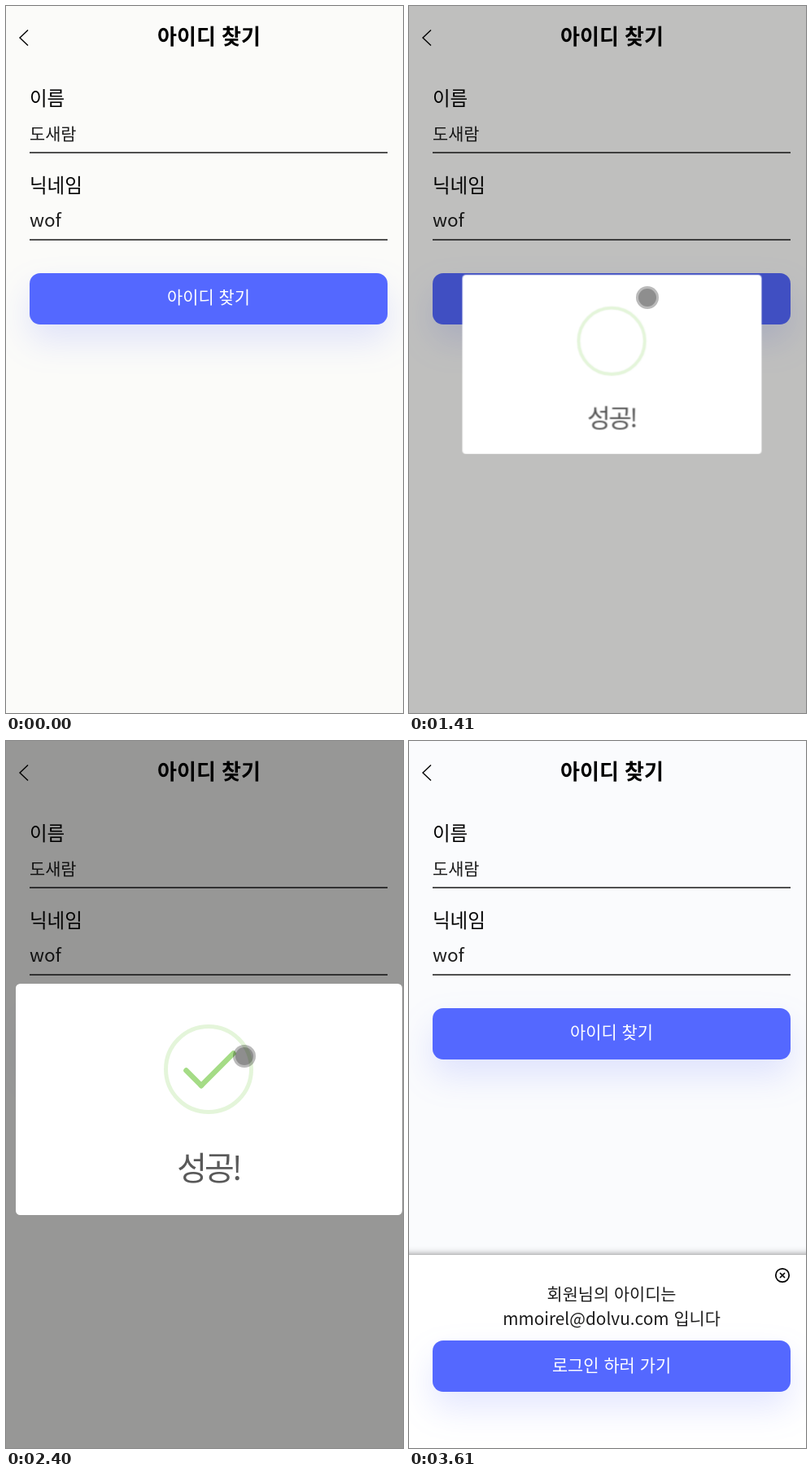
Animation, 488 px wide and 868 px high, one loop 4810 ms. Source, as an HTML page:

```html
<!DOCTYPE html>
<html lang="ko">
<head>
<meta charset="utf-8">
<title>아이디 찾기</title>
<style>
  html, body { margin: 0; width: 100%; height: 100%; overflow: hidden; background: #fbfbf9; }
  svg { display: block; width: 488px; height: 868px; font-family: "Noto Sans CJK KR", "Noto Sans CJK", "Noto Sans", sans-serif; }
  .mid { text-anchor: middle; }
  .title { font-size: 26px; font-weight: 700; }
  .label { font-size: 23.5px; font-weight: 500; }
  .thin { font-size: 20.8px; font-weight: 100; fill: #1c1c1c; }
  .latin { font-size: 22.5px; }
  .field { stroke: #505050; stroke-width: 2; }
  .btn rect { fill: #5468ff; filter: drop-shadow(0 20px 20px rgba(84, 104, 255, .16)); }
  .btn text { font-size: 20.9px; font-weight: 500; fill: #fff; text-anchor: middle; }
  .line { fill: none; stroke: #000; stroke-width: 1.4; }
  .close { stroke-width: 1.7; }
  #press { fill: #33b5e5; fill-opacity: .4; }
  #panel { fill: #fff; filter: drop-shadow(0 0 5px rgba(0, 0, 0, .5)); }
  #popup { transform-origin: 249.5px 440px; }
  #popup text { font-size: 40px; font-weight: 300; letter-spacing: -3px; fill: #595959; }
  .ring { fill: none; stroke: #a5dc86; stroke-opacity: .3; stroke-width: 5; }
  .tick { fill: none; stroke: #a5dc86; stroke-width: 6.6; stroke-linecap: round; }
</style>
</head>
<body>
<svg viewBox="0 0 488 868">
  <rect id="page" width="488" height="868" fill="#fbfbf9"/>
  <path class="line" d="M27 29.5L17 39L27 48.5"/>
  <text class="title mid" x="249.5" y="46.5">아이디 찾기</text>
  <text class="label" x="29" y="122">이름</text>
  <text class="thin" x="29" y="164.5">도새람</text>
  <path class="field" d="M29 180H469M29 287H469"/>
  <text class="label" x="29" y="229">닉네임</text>
  <text class="thin latin" x="29" y="271">wof</text>
  <g class="btn">
    <rect x="29" y="328" width="440" height="63" rx="13"/>
    <text x="249" y="364.5">아이디 찾기</text>
  </g>
  <rect id="press" x="29" y="328" width="440" height="63"/>

  <g id="sheet">
    <rect id="panel" x="-20" y="631" width="528" height="260"/>
    <circle class="line close" cx="459" cy="656" r="8.2"/>
    <path class="line close" d="M456 653l6 6m0-6l-6 6"/>
    <text class="thin mid" x="249" y="686.5">회원님의 아이디는</text>
    <text class="thin mid" x="249" y="716.5">mmoirel@dolvu.com 입니다</text>
    <g class="btn">
      <rect x="29" y="736" width="440" height="63" rx="13"/>
      <text x="249" y="773.5">로그인 하러 가기</text>
    </g>
  </g>

  <rect id="dim" width="488" height="868"/>
  <g id="popup">
    <rect x="12" y="298" width="475" height="284" rx="5.5" fill="#fff"/>
    <circle class="ring" cx="249" cy="403" r="52.5"/>
    <path id="tip" class="tick"/>
    <path id="stem" class="tick"/>
    <text class="mid" x="249" y="539">성공!</text>
  </g>

  <g id="cursor">
    <circle r="14" fill-opacity=".27"/>
    <circle r="11" fill-opacity=".24"/>
  </g>
</svg>
<script>
  const LOOP = 4810, STEP = 1000 / 15;
  const tracks = [];

  // stops: [ms, value, easing towards the next stop]
  function track(id, prop, stops) {
    const poses = stops.map(([ms, value, easing = 'linear']) => ({ offset: ms / LOOP, [prop]: value, easing }));
    if (poses[0].offset > 0) poses.unshift({ ...poses[0], offset: 0, easing: 'step-end' });
    poses.push({ ...poses[poses.length - 1], offset: 1 });
    const anim = document.getElementById(id).animate(poses, { duration: LOOP, iterations: Infinity });
    anim.pause();
    tracks.push(anim);
  }

  const move = (x, y) => `translate(${x}px, ${y}px)`;
  const seg = (x1, y1, x2, y2) => `path("M${x1} ${y1}L${x2} ${y2}")`;
  const hold = 'step-end';

  track('cursor', 'transform', [
    [0, move(436, 890), hold],
    [133, move(435, 864)], [333, move(422, 745)], [467, move(400, 665)],
    [533, move(376, 606)], [600, move(350, 553)], [666, move(328, 491)],
    [733, move(311, 425)], [800, move(298, 375)], [866, move(293, 358)],
    [2333, move(293, 358)], [2400, move(293, 387)], [2467, move(297, 440)],
    [2667, move(332, 640), 'ease-out'], [2940, move(372, 777)],
    [3200, move(372, 777)], [3333, move(377, 812)], [3467, move(388, 850)],
    [3533, move(400, 866)], [3595, move(400, 890)]
  ]);

  track('press', 'opacity', [[0, 0, hold], [1130, 1, hold], [1390, 0]]);
  track('page', 'fill', [[0, '#fbfbf9', hold], [2900, '#fafbfd']]);
  track('dim', 'opacity', [[1340, 0], [1440, .4], [2885, .4], [2985, 0]]);

  track('popup', 'opacity', [[0, 0, hold], [1378, 1], [2885, 1, 'ease'], [3035, 0]]);
  track('popup', 'transform', [
    [1378, 'scale(.7)', 'ease'], [1513, 'scale(1.05)', 'ease'],
    [1618, 'scale(.95)', 'ease'], [1666, 'scale(1)'],
    [2885, 'scale(1)', 'ease'], [3035, 'scale(.5)']
  ]);

  track('tip', 'opacity', [[0, 0, hold], [1790, 1]]);
  track('tip', 'd', [
    [1790, seg(197, 378, 197.5, 378.5), 'ease'], [1910, seg(199, 378, 243, 422), 'ease'],
    [2015, seg(230, 412, 242, 424), 'ease'], [2132, seg(221.5, 404.5, 240, 423)]
  ]);
  track('stem', 'opacity', [[0, 0, hold], [1872, 1]]);
  track('stem', 'd', [
    [1872, seg(240, 426, 240.5, 425.5), 'ease'], [2015, seg(243, 424, 291, 376), 'ease'],
    [2132, seg(240, 423, 279.5, 383.5)]
  ]);

  track('sheet', 'transform', [[2930, move(0, 250), 'ease'], [3199, move(0, 0)]]);

  const start = performance.now();
  function draw() {
    const t = Math.max(0, performance.now() - start) % LOOP;
    const time = Math.floor((t + 4) / STEP) * STEP;
    for (const anim of tracks) anim.currentTime = time;
    requestAnimationFrame(draw);
  }
  draw();
</script>
</body>
</html>
```
